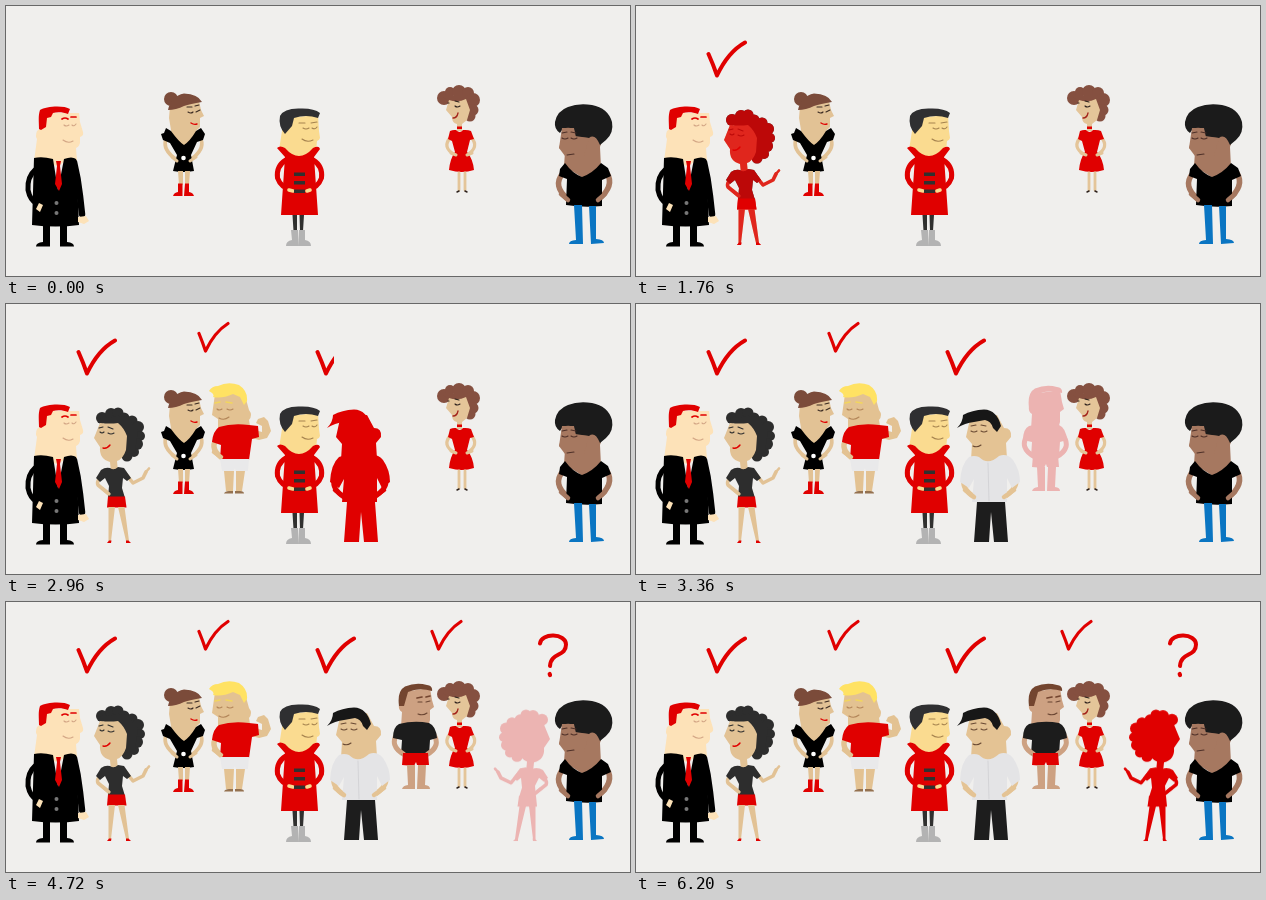
Write an HTML page that moves like this. It is 624 by 270 pixels and loops after 9.24 s.

```html
<!DOCTYPE html>
<html lang="en">
<head>
<meta charset="utf-8">
<title>Couples</title>
<style>
html, body { margin: 0; width: 100%; height: 100%; overflow: hidden; background: #f0efed; }
svg { display: block; width: 624px; height: 270px; }
.l { fill: none; stroke-linecap: round; stroke-linejoin: round; }
.thin { stroke-width: 1.1; }
.r { fill: #e00000; }
.rl { stroke: #e00000; }
.shade { filter: url(#red); opacity: 0; }
#dot { transform-box: fill-box; transform-origin: center; }
</style>
</head>
<body>
<svg viewBox="0 0 624 270">
<defs>
  <filter id="red" color-interpolation-filters="sRGB">
    <feFlood flood-color="#e00000"/>
    <feComposite in2="SourceAlpha" operator="in"/>
  </filter>
</defs>

<!-- man in a suit -->
<g>
  <path fill="#fde2b8" d="M42 107L73 107 74 116 77 126Q78 130 74 131L74 137Q73 141 70 142L71 155 58 156 52 160 28 155 31 133Q29 130 31 125L36 121Z"/>
  <path class="r" d="M34 104C40 100 58 99 64 103L62 108C57 106 51 106 47 107L45 111 41 112 40 121 35 124 33 123C33 115 32 110 34 104Z"/>
  <g class="l rl" stroke-width="1.700"><path d="M56 113Q59 111 62 113M65 111L70 111"/></g>
  <g class="l thin" stroke="#d3a685"><path d="M58 119Q60 121 63 119M66 119Q68 121 70 118M57 134Q62 138 67 135"/></g>
  <path class="l" stroke="#000" stroke-width="5" d="M29 164Q21 171 22 184Q24 194 31 198"/>
  <path class="l" stroke="#000" stroke-width="6.500" d="M68 156Q72 172 74 190L76 208"/>
  <path d="M28 152Q36 150 47 153L52 184 58 153Q66 150 70 153L73 219Q50 222 26 219Z"/>
  <path class="r" d="M50 155H55L54 160 56 178 53 185 49 178 51 160Z"/>
  <path fill="#fde2b8" d="M33 197L37 199 34 206 30 203ZM72 211L80 210 83 215 78 218 72 216Z"/>
  <circle cx="50.500" cy="197" r="2" fill="#777"/><circle cx="50.500" cy="207" r="2" fill="#777"/>
  <path d="M37 218H44V240.500H30Q30 236.500 37 236ZM54 218H61V236Q68 236.500 68 240.500H54Z"/>
</g>

<!-- woman with a bun -->
<g>
  <path fill="#e2c295" d="M164 100L193 95 195 104 198 110 194 112 194 121 190 125 188 142H168L163 112Z"/>
  <g fill="#7b4b3a"><circle cx="165" cy="93" r="7"/>
  <path d="M162 104Q165 90 178 87.500Q192 88 196 96Q184 98 178 100Q170 104 162 104Z"/></g>
  <g class="l thin" stroke="#3a2a22"><path d="M181 101L186 101M189 100L193 99M182 106Q185 108 187 106M190 106L194 104"/></g>
  <path class="l rl" stroke-width="1.400" d="M185 117Q188 119 191 118"/>
  <path class="l" stroke="#e2c295" stroke-width="3.600" d="M160 133Q156 144 171 154M195 133Q199 144 184 154"/>
  <path d="M160 122L165 125Q173 136 178 139Q184 135 190 125L195 122 199 128 197 134 191 136 185 149 188 165Q177 167 167 165L171 149 164 137 157 134 155 128 158 127Z"/>
  <path class="l" stroke="#e2c295" stroke-width="3" d="M166 151L171 155M190 151L184 155"/>
  <circle cx="177.500" cy="152" r="2.300" fill="#fff"/>
  <path fill="#e2c295" d="M172 165H177V179H173ZM179 165H184L183 179H179Z"/>
  <path class="r" d="M172 177.500H176.500V190H167Q168 186.500 172 186ZM179 177.500H183V186Q187 186.500 188 190H178Z"/>
</g>

<!-- man in a red coat -->
<g>
  <path fill="#fadb90" d="M279 112L312 109 313 125 314 132Q313 135 311 135L310 146Q300 152 286 150L273 144 276 125Z"/>
  <path fill="#2f2f31" d="M274 110Q278 102 294 102.500Q308 102 314 107L312 112Q300 108 288 112L286 120 279 128Q272 120 274 110Z"/>
  <g class="l thin" stroke="#a5834f"><path d="M293 117L299 117M305 117L311 116M297 122Q300 124 303 122M306 122Q309 124 311 121M296 133Q301 137 307 134"/></g>
  <path class="l rl" stroke-width="5" d="M280 154Q270 160 271.500 172Q275 182 286 184M307 154Q317 160 315.500 172Q312 182 301 184"/>
  <path class="r" d="M271 142Q274 139 279 142Q293 158 307 142Q313 139 314 143L308 151 312 209H275L279 151Z"/>
  <path class="l" stroke="#fadb90" stroke-width="3.600" d="M283 184L287 185M301 185L304 184"/>
  <path fill="#30302f" d="M288 166.500H299V170H288ZM288 175H299V178.500H288ZM288 183.500H299V187H288ZM286.500 209H291V225H287.500ZM293.500 209H298L297 225H294Z"/>
  <path fill="#b3b3b3" d="M285 224H292V240H280Q280 235 286 234ZM293 224H299V234Q305 235 305 240H292Z"/>
</g>

<!-- woman in a red dress -->
<g>
  <g fill="#855040"><circle cx="438" cy="92" r="7"/><circle cx="444" cy="86" r="5"/><circle cx="453" cy="86" r="7"/><circle cx="462" cy="87" r="6"/><circle cx="467" cy="94" r="7"/><circle cx="467" cy="104" r="5.500"/><circle cx="464" cy="110" r="5.500"/><path d="M437 90H465V110H455Z"/></g>
  <path fill="#e4c599" d="M443 94Q452 97 460 93L464 104 461 114 456 118V125H451V118Q446 117 446 111L440 104Z"/>
  <g class="l thin" stroke="#2c211d"><path d="M442 97L443 97M449 95L453 96M449 100Q451 102 454 100"/></g>
  <path class="l" stroke="#a3241c" stroke-width="1.300" d="M447 112Q451 112 452 107"/>
  <path class="l" stroke="#e4c599" stroke-width="3.300" d="M445 131Q435 141 449 149M465 131Q474 141 461 149"/>
  <path class="r" d="M451 120.500H456V123H451ZM444 125Q447 123.500 450 124Q454 128 457 124Q462 123.500 465 125L468 133 464 134 461 146Q467 153 468 164Q456 168 443 164Q444 153 449 146L446 135 442 133Z"/>
  <path class="l" stroke="#e4c599" stroke-width="3" d="M445 147L450 149M466 147L461 149"/>
  <path class="l" stroke="#e4c599" stroke-width="2.800" d="M453 167V184M459 167V184"/>
  <path class="l" stroke="#2c211d" stroke-width="1.500" d="M451 186L453 185M459 185L461 186"/>
</g>

<!-- man in blue jeans -->
<g>
  <path fill="#a67860" d="M560 120L593 128Q597 134 594 141L595 162 577 172 558 160 559 146 553 142Z"/>
  <path fill="#1b1b1b" d="M549 116Q551 105 562 101Q572 97 586 99Q602 102 606 116Q608 127 600 134L594 139Q589 127 583 132L570 131 568 123Q558 119 554 127Q548 123 549 116Z"/>
  <path fill="#a67860" d="M556 122H568L569 130 583 132 578 150H559L553 142Z"/>
  <g class="l thin" stroke="#4e3028"><path d="M556 127L561 126M565 126L570 127M556 132Q559 134 562 132M565 132Q568 134 571 132M561 149L568 148"/></g>
  <path class="l" stroke="#a67860" stroke-width="5.500" d="M557 167Q546 180 562 193M601 167Q609 180 592 194"/>
  <path d="M554 163L559 157Q566 167 576 171Q587 167 595 157L602 162 605 170 596 174 596 200Q578 202 560 199L561 173 553 170Z"/>
  <path class="l" stroke="#a67860" stroke-width="4.500" d="M555 188L562 194M599 188L592 194"/>
  <path fill="#0a75c2" d="M568 199H576L577 238H563Q563 234.500 570 234ZM583 200H590V233Q598 233.500 598 237L585 238Z"/>
</g>

<!-- curly woman -->
<g id="curly">
  <g fill="#2d2d2d"><circle cx="96" cy="114" r="6"/><circle cx="105" cy="110" r="6"/><circle cx="112" cy="109" r="5.500"/><circle cx="118" cy="114" r="5.500"/><circle cx="126" cy="117" r="5.500"/><circle cx="132" cy="123" r="6"/><circle cx="134" cy="132" r="5"/><circle cx="131" cy="140" r="6"/><circle cx="128" cy="148" r="5"/><circle cx="121" cy="152" r="5.500"/><path d="M94 114L120 112 132 126 129 148 118 152 100 122Z"/></g>
  <path fill="#e2c295" d="M94 119Q104 120 112 119Q118 124 121 132L120 146Q117 155 111 157L112 168H105L104 158Q93 155 94 143L88 134Z"/>
  <g class="l thin" stroke="#2d2d2d"><path d="M93 124L97 123M102 123L107 125M94 128Q96 130 98 128M102 129Q105 131 108 129"/></g>
  <path class="l rl" stroke-width="1.400" d="M97 144Q101 145 104 141"/>
  <path class="l" stroke="#e2c295" stroke-width="3.600" d="M97 170Q90 177 92 181L103 190M119 169L127 179 137 174 140 168"/>
  <path class="l" stroke="#e2c295" stroke-width="2.600" d="M139 169L143 164.500"/>
  <path fill="#2d2d2d" d="M95 166Q99 163 104 164Q108 167 112 163L118 164 125 174 121 177 117 174 116 184 119 194H102L103 182 99 174 94 178 90 174Z"/>
  <path class="r" d="M102 192.500H119L120.500 203.500H101Z"/>
  <path class="l" stroke="#e2c295" stroke-width="3.300" d="M97 185L103 190"/>
  <path fill="#e2c295" d="M102.500 203H109L105 237H102.500ZM112 203H118.500L123 237H120Z"/>
  <path class="r" d="M101 239L103 236.500H105.500L105 239ZM120 236.500H122.500L125 239H120Z"/>
</g>

<!-- blond man -->
<g id="blond">
  <path fill="#e3c292" d="M209 90L238 88 243 106Q247 111 243 116L245 128 212 128 212 115 206 111Z"/>
  <path fill="#ffe263" d="M203 87Q206 82 212 82Q222 77 233 81Q242 87 241 97L238 101 234 93 227 90Q216 95 207 93Q209 90 203 87Z"/>
  <g class="l thin" stroke="#b28559"><path d="M211 105Q213 107 216 105M221 105Q224 107 227 105M213 114Q218 117 223 113"/></g>
  <path class="l" stroke="#f2d65e" stroke-width="1.500" d="M209 99L214 98M220 98L226 99"/>
  <path class="l" stroke="#e3c292" stroke-width="5.500" d="M213 132Q202 143 215 153"/>
  <path fill="#e3c292" d="M245 125L256 128 256 122 250 119 252 115 258 113 262 117 265 127 261 134 253 136 246 134Z"/>
  <path class="r" d="M213 123Q226 119 243 121L252 122 253 133 246 135 243 156H214L215 141 206 138Q207 127 213 123Z"/>
  <path class="l" stroke="#e3c292" stroke-width="4.500" d="M208 148L215 153"/>
  <path fill="#e9e9ea" d="M214 155H243L242 167 230 168 229 164 227 168 216 167Z"/>
  <path fill="#e3c292" d="M218 167H228L227 187H220ZM230 167H239L236 187H230Z"/>
  <path fill="#94714f" d="M218 189.500Q219 187 223 187H227V189.500ZM229 187H234Q238 187 238 189.500H229Z"/>
</g>

<!-- man in a white shirt -->
<g id="quiff">
  <path fill="#e4c394" d="M334 115L361 111 368 124Q376 124 375 133L370 139 371 155 352 162 335 156 336 140 330 133Z"/>
  <path fill="#171717" d="M321 124Q327 118 327 111Q336 106 348 105.500Q361 106 365 122L361 128 357 124Q355 117 349 116L338 118Q329 119 321 124Z"/>
  <g class="l thin" stroke="#684933"><path d="M335 122L340 121M345 121L350 122M335 127Q338 129 341 127M345 127Q348 129 351 127M337 142Q341 144 345 141"/></g>
  <path class="l" stroke="#e4c394" stroke-width="5" d="M328 176Q326 185 338 193M380 176Q381 185 368 193"/>
  <path fill="#e4e4e6" d="M333 153Q338 151 343 153Q352 162 363 152Q371 149 377 156Q384 166 384 178L376 184 371 174 371 198H336L338 175 333 184 324 178Q325 160 333 153Z"/>
  <path class="l" stroke="#d2d2d5" stroke-width=".9" d="M352 159L353 197"/>
  <path class="l" stroke="#e4c394" stroke-width="4.500" d="M329 186L338 193M378 186L368 193"/>
  <path fill="#1d1d1d" d="M341 198H369L372 238H358L355 208 353 238H338Z"/>
</g>

<!-- man in red shorts -->
<g id="shorts">
  <path fill="#cda182" d="M396 90L424 86 426 98 428 105 424 108 424 118 422 125H395L396 110Q392 108 393 102Z"/>
  <path fill="#73452f" d="M393 104Q391 89 399 84.500Q410 80 421 83Q427 84 426 89Q413 85 402 90L398 104Z"/>
  <g class="l" stroke="#73452f" stroke-width="1.700"><path d="M411 96L416 95M420 95L424 94"/></g>
  <g class="l thin" stroke="#6b4633"><path d="M412 100L416 100M420 100L424 99M412 112Q417 114 421 111"/></g>
  <path class="l" stroke="#cda182" stroke-width="5" d="M392 130Q382 144 399 153M426 130Q437 144 420 153"/>
  <path fill="#1c1c1c" d="M393 122Q408 118 423 121Q430 124 431 136L424 138 423 153H395L396 138 387 136Q387 125 393 122Z"/>
  <path class="l" stroke="#cda182" stroke-width="4" d="M391 147L398 152M428 147L421 152"/>
  <path class="r" d="M397 151H422L423 163H411L410 160 408 164 396 163Z"/>
  <path fill="#cda182" d="M401 163H409V187H396Q397 183.500 402 183ZM412 163H420L419 183Q424 183.500 424 187H411Z"/>
</g>

<use id="lone" href="#curly" transform="matrix(-1 0 0 .97 632 7.200)"/>

<g class="l rl">
  <path class="check" stroke-width="4" d="M72.500 48Q77 58 81 69.500Q92 46 109 36.500"/>
  <path class="check" stroke-width="3.200" d="M193 29.500Q196.500 38 199.500 47Q208.500 28 222 19.500"/>
  <path class="check" stroke-width="4" d="M311.500 48Q316 58 320 69.500Q331 46 348 36.500"/>
  <path class="check" stroke-width="3.200" d="M426 29.500Q429.500 38 432.500 47Q441.500 28 455 19.500"/>
  <path id="hook" stroke-width="4" pathLength="1" stroke-dasharray="1 2" d="M534 41.500C535 30.500 560 31 560 42.500C560 55 545 50 544 64"/>
  <path id="dot" stroke-width="4.200" d="M543.700 72L544 73"/>
</g>
</svg>

<script>
const LOOP = 9240, STEP = 40;
const $ = id => document.getElementById(id);

// Each ramp: [start ms, number of steps, from, to]
function play(el, prop, ramps) {
  const frames = [{ offset: 0, [prop]: ramps[0][2] }];
  for (const [start, n, from, to] of ramps) {
    frames.push({ offset: start / LOOP, [prop]: from, easing: `steps(${n}, start)` });
    frames.push({ offset: (start + n * STEP) / LOOP, [prop]: to });
  }
  frames.push({ offset: 1, [prop]: ramps[ramps.length - 1][3] });
  el.animate(frames, { duration: LOOP, iterations: Infinity });
}

const show = (el, at) => play(el, 'opacity', [[at, 1, 0, 1]]);
const inset = right => `inset(-5px ${right}% -5px -5px)`;

// Silhouette appears, its check is wiped in, then the colours come through
const partners = [['curly', 1200, 1560], ['blond', 2000, 2240], ['quiff', 2680, 2920], ['shorts', 3360, 3600]];
const checks = document.querySelectorAll('.check');

partners.forEach(([id, enter, tick], i) => {
  const body = $(id), reveal = tick + 200;
  const shade = document.createElementNS('http://www.w3.org/2000/svg', 'use');
  shade.setAttribute('href', '#' + id);
  // wrapping keeps the figure itself opaque for reuse
  const wrap = document.createElementNS(shade.namespaceURI, 'g');
  body.replaceWith(wrap);
  wrap.append(body);
  shade.classList.add('shade');
  wrap.after(shade);
  show(wrap, reveal);
  play(shade, 'opacity', [[enter, 4, 0, 1], [reveal, 5, 1, 0]]);
  show(checks[i], tick);
  play(checks[i], 'clipPath', [[tick, 5, inset(100), inset(-10)]]);
});

// The last silhouette blinks and stays red
const blinks = [];
for (let t = 4040; t <= 6080; t += 680) {
  blinks.push([t, 4, 0, 1]);
  if (t < 6080) blinks.push([t + 360, 4, 1, 0]);
}
$('lone').classList.add('shade');
play($('lone'), 'opacity', blinks);

show($('hook'), 4040);
play($('hook'), 'strokeDashoffset', [[4080, 9, 0.99, 0]]);
show($('dot'), 4440);
play($('dot'), 'transform', [[4440, 6, 'scale(0)', 'scale(1)']]);
</script>
</body>
</html>
```
